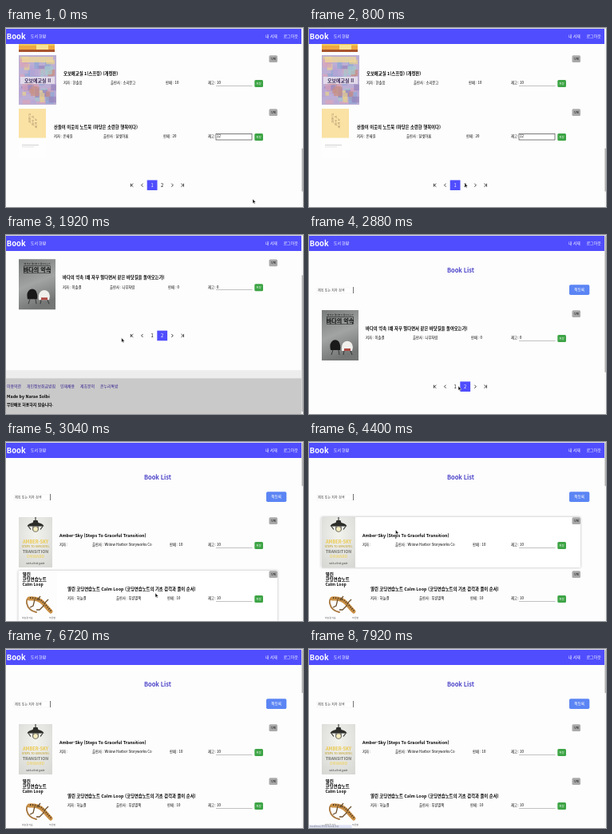
Recreate the animation shown at these times as an HTML page. Size 372 px wide and 224 px high, loop 8000 ms.

```html
<!DOCTYPE html>
<html lang="ko">
<head>
<meta charset="utf-8">
<title>Book List</title>
<style>
  html, body { margin: 0; width: 100%; height: 100%; overflow: hidden; background: #fff; }
  svg { display: block; width: 100vw; height: 100vh; }
  text { font-family: "Noto Sans CJK KR", "Noto Sans CJK", "Noto Sans", sans-serif; white-space: pre; }
  #hover { filter: drop-shadow(0 .6px 1.4px rgba(0, 0, 0, .3)); }
</style>
</head>
<body>
<svg id="stage" viewBox="0 0 372 224"></svg>
<script>
const LOOP = 8000, STEP = 80, VIEW = 224, ROW = 67, TOP = 94;
const INDIGO = '#504dff';

const rect = (x, y, w, h, fill, more = '') =>
  `<rect x="${x}" y="${y}" width="${w}" height="${h}" fill="${fill}" ${more}/>`;
const text = (x, y, size, str, fill = '#000', more = '') =>
  `<text x="${x}" y="${y}" font-size="${size}" fill="${fill}" ${more}>${str}</text>`;
const path = (d, fill, more = '') => `<path d="${d}" fill="${fill}" ${more}/>`;
const MID = ' text-anchor="middle"', MEDIUM = ' font-weight="500"';
const BOLD = ' font-weight="700"', BLACK = ' font-weight="900"';

function random(seed) {
  return () => (seed = (seed * 16807) % 2147483647) / 2147483647;
}

// Book covers, drawn from the top left corner of the picture
const covers = {
  lamp: () => rect(0, 0, 42, 63, 'url(#pale)') +
    path('M21 0V6', 'none', 'stroke="#222" stroke-width="1"') +
    path('M18.5 4h5l1 3q6 1 7 4.5H10.5q1-3.5 7-4.5z', '#2d2d2a') +
    path('M12 11.5l3 4m15-4l-3 4M18 11.5v5m6-5v5', 'none', 'stroke="#2d2d2a" stroke-width="1.1"') +
    `<circle cx="21" cy="15" r="3.4" fill="#f7eec0" stroke="#444" stroke-width=".7"/>` +
    text(21, 33, 5.6, 'AMBER-SKY', '#ecc94a', BOLD + MID) +
    text(21, 38.4, 3.4, 'STEPS TO GRACEFUL', '#c9ad48', BOLD + MID) +
    text(21, 45, 5.3, 'TRANSITION', '#77776f', BOLD + MID) +
    text(21, 51, 5, 'ONWARD', '#ecd477', BOLD + MID) +
    text(21, 59, 2.8, 'with a field guide', '#333', MID),

  lizard: () => rect(0, 0, 48, 63, '#fdfdfd') +
    text(4.5, 7, 5.6, '열린', '#000', BLACK) +
    text(4.5, 13.2, 5.5, '코딩연습노트', '#000', BLACK) +
    text(4.5, 19.4, 5, 'Calm Loop', '#000', BLACK) +
    path('M16 36Q9 32 10 41Q12 50 22 52', 'none', 'stroke="#a8783f" stroke-width="1.8" stroke-linecap="round"') +
    path('M13 35Q25 34 31 41T40 51', 'none', 'stroke="#c98f45" stroke-width="5" stroke-linecap="round"') +
    path('M14 34Q26 34 32 41T41 51', 'none', 'stroke="#4d3a24" stroke-width="2" stroke-dasharray="1.2 1.6"') +
    path('M20 36l-2 8-4 2m18-3l-6 6-4 0m10-8l5-5m-14 1l4-5', 'none', 'stroke="#6d5230" stroke-width="1.3"') +
    text(4, 60, 2.8, '하늘결 지음', '#555') + text(38, 60, 2.8, '푸른별', '#555'),

  strip: () => rect(0, 0, 45, 63, '#f2ca54') + rect(0, 55, 45, 5, '#eda842') +
    rect(0, 60, 45, 3, '#a8542e') + rect(22, 54, 15, 6, '#f8e292'),

  mosaic() {
    const next = random(41), tones = ['#b9a4d4', '#8fa7d4', '#d9a5bd', '#e6cf91', '#a9c6cd', '#c98f86', '#9785bd'];
    let out = rect(0, 0, 47, 62, '#bcaed4');
    for (let i = 0; i < 60; i++) {
      const w = 4 + next() * 8, h = 3 + next() * 9;
      out += rect(next() * (47 - w), next() * (62 - h), w, h, tones[i % tones.length], 'opacity=".75"');
    }
    return out + rect(4, 2, 39, 7, '#efd79b', 'opacity=".8"') +
      rect(2, 27, 43, 9, '#e9e2ee', 'opacity=".85"') +
      text(23.5, 34, 6, '오보에교실 II', '#3b2c58', BOLD + MID);
  },

  yellow: () => rect(0, 0, 34, 62, '#fefefe') + rect(0, 0, 34, 36.5, '#fae2a4') +
    ['산들이', '이웃의', '노트북'].map((s, i) =>
      [...s].map((c, j) => text(12 + i * 4, 9 + j * 4.5 + i * 3, 3.4, c, '#8b6b55')).join('')).join('') +
    rect(4, 45, 21, .8, '#c7c7c7') + rect(4, 47.5, 15, .7, '#d8d8d8'),

  paradox: () => rect(0, 0, 46, 63, 'url(#stone)') +
    text(23, 6.5, 2.8, '왜 자꾸 멀다면서 돌아오는가', '#111', MID) +
    rect(6.5, 8.5, 33, 9, 'none', 'stroke="#222" stroke-width=".6"') +
    text(23, 16, 7, '바다의 약속', '#080808', BLACK + MID) +
    path('M11 50q-2-9 3-12q4-2 7 1q3 4 2 11z', '#191919') +
    path('M25 51q-1-8 3-11q5-3 9 1q3 4 1 10z', '#f0efec') +
    path('M14 50l-2 6m9-6l1 6m6-5l-1 5m9-5l2 5', 'none', 'stroke="#222" stroke-width=".8"') +
    path('M28 48h8v3h-8z', '#b04a43')
};

const book = (row, cover, x, title, author, pubX, pub, soldX, sold, stock, boxed) =>
  ({ row, cover, x, title, author, pubX, pub, soldX, sold, stock, boxed });

const firstPage = [
  book(0, 'lamp', 67, 'Amber-Sky (Steps To Graceful Transition)', '', 108, 'Willow Harbor Storyworks Co', 205, 10, 10),
  book(1, 'lizard', 77, '열린 코딩연습노트 Calm Loop (코딩연습노트의 기초 감각과 풀이 순서)', '하늘결', 138, '푸른별책', 202, 10, 10),
  book(7, 'strip', 72, '', '', 131, '', 200, 10, 10),
  book(8, 'mosaic', 72, '오보에교실 1(스프링) (개정판)', '한솔음', 131, '소리문고', 200, 10, 10),
  book(9, 'yellow', 60, '산들이 이웃의 노트북 (마당은 소란한 행복이다)', '온새길', 122, '달빛아홉', 197, 20, 12, true)
];
const secondPage = [
  book(0, 'paradox', 71, '바다의 약속 (왜 자꾸 멀다면서 같은 바닷길을 돌아오는가)', '이솔결', 130, '나무처럼', 203, 0, 0)
];

function card(b) {
  const info = (x, str) => text(x, 36.3, 4.3, str);
  const field = b.boxed
    ? rect(263, 31.5, 45, 7.5, '#fff', 'stroke="#444" stroke-width=".7"')
    : rect(263, 38, 45.5, .6, '#999');
  return `<g transform="translate(0 ${TOP + b.row * ROW})">
    <g transform="translate(16 0)">${covers[b.cover]()}</g>
    ${text(b.x, 25, 5.35, b.title, '#000', BOLD)}
    ${info(b.x, '저자 : ' + b.author)}${info(b.pubX, '출판사 : ' + b.pub)}
    ${info(b.soldX, '판매 : ' + b.sold)}${info(253, '재고 :')}
    ${field}${info(264, b.stock)}
    ${rect(329.5, .3, 10.5, 8.7, '#aaa', 'rx="1.5"')}${text(334.7, 6, 3.6, '삭제', '#000', MID)}
    ${rect(311.3, 31, 10.7, 9, '#3da445', 'rx="1.5"')}${text(316.6, 36.8, 3.5, '저장', '#fff', MID)}
  </g>`;
}

function pager(y, pages, active) {
  const gap = 12.6, x0 = 189.4 - (pages + 3) * gap / 2;
  const arrow = (i, d) => `<path transform="translate(${x0 + i * gap} ${y})" d="${d}" fill="none" stroke="#111" stroke-width=".8"/>`;
  let out = arrow(0, 'M-1.5-2V2M1.4-2L-.7 0L1.4 2') + arrow(1, 'M1-2L-1 0L1 2') +
    arrow(pages + 2, 'M-1-2L1 0L-1 2') + arrow(pages + 3, 'M1.5-2V2M-1.4-2L.7 0L-1.4 2');
  for (let i = 1; i <= pages; i++) {
    const x = x0 + (i + 1) * gap, on = i === active;
    if (on) out += rect(x - 6.4, y - 6.3, 12.8, 12.6, INDIGO);
    out += text(x, y + 2.1, 5.7, i, on ? '#fff' : '#000', MID + (on ? '' : MEDIUM));
  }
  return out;
}

function footer(y) {
  const links = [[1, '이용약관'], [26, '개인정보취급방침'], [68, '인재채용'], [93, '제휴문의'], [118, '온누리톡방']];
  return rect(0, y - 10, 370, 10, '#ededed') + rect(0, y, 370, 60, '#c9c9c9') +
    links.map(([x, s]) => text(x, y + 11.5, 4.9, s, '#35208f', MEDIUM)).join('') +
    text(1, y + 25, 5.3, 'Made by Narae Solbi', '#000', BOLD) +
    text(1, y + 35, 4.9, '무단배포 허용하지 않습니다.', '#000', BOLD);
}

function page(id, rows, books, pages, active) {
  const end = rows ? rows * ROW : 1;
  const edge = rows ? '#f0f0f0' : '#777';
  return `<g id="${id}">
    ${text(190, 47, 7.4, 'Book List', '#4a42c8', BOLD + MID)}
    ${rect(10, 66, 45.7, 7, '#fff', `stroke="${edge}" stroke-width=".6"`)}
    ${rect(55, 65, .9, 8, '#666')}
    ${text(11, 71, 4.1, '제목 또는 저자 검색', '#444')}
    ${rect(326, 62.3, 25.3, 12.7, '#5b85f4', 'rx="1.8"')}
    ${text(338.6, 70.4, 4.8, '책등록', '#fff', MID + MEDIUM)}
    ${books.map(card).join('')}${pager(122.7 + end, pages, active)}${footer(176 + end)}
  </g>`;
}

const stage = document.getElementById('stage');
stage.innerHTML = `
  <defs>
    <linearGradient id="stone" x2=".3" y2="1"><stop stop-color="#777b7a"/><stop offset=".55" stop-color="#a2a4a3"/><stop offset="1" stop-color="#737675"/></linearGradient>
    <radialGradient id="pale" cy=".35" r=".8"><stop stop-color="#f3f3ee"/><stop offset="1" stop-color="#d6d7d3"/></radialGradient>
  </defs>
  ${rect(0, 0, 372, VIEW, '#fdfdfd')}
  ${rect(15.5, 0, 324.5, 63, '#fff', 'id="hover"')}
  ${page('first', 10, firstPage, 2, 1)}
  ${page('second', 1, secondPage, 2, 2)}
  ${page('empty', 0, [], 1, 1)}
  ${rect(0, 0, 370, 20, INDIGO)}
  ${text(.8, 14.2, 9.4, 'Book', '#fff', BOLD)}
  ${text(31, 12.3, 4.9, '도서 현황', '#fff', MEDIUM)}
  ${text(325, 12.3, 4.9, '내 서재', '#fff', MEDIUM)}
  ${text(347.5, 12.3, 5, '로그아웃', '#fff', MEDIUM)}
  ${rect(370, 0, 2, VIEW, '#f7f7f7')}
  ${rect(370.5, 0, 1.5, 10, '#b0b0b0', 'id="thumb" rx=".7"')}
  ${rect(0, 0, 372, 1, '#dcdcdc')}
  <g id="status">${rect(0, 220.3, 53.5, 4, '#dfe3f6')}${text(1, 223.4, 3.2, 'localhost:3000/book/list', '#777')}</g>
  ${path('M0 0V5.4L1.3 4.3L2.1 6.2L3 5.8L2.2 4H3.8z', '#111', 'id="cursor" stroke="#fff" stroke-width=".4"')}`;

const el = {};
stage.querySelectorAll('[id]').forEach(e => el[e.id] = e);
const show = (e, on) => e.setAttribute('display', on ? 'inline' : 'none');

const ease = p => p * p * (3 - 2 * p);
const ramp = (t, a, b) => ease(Math.min(1, Math.max(0, (t - a) / (b - a))));

// Pointer path: time, x, y
const track = [
  [0, 309, 214], [400, 195, 194], [960, 195, 194], [1440, 143.5, 127], [1840, 143.5, 127],
  [2640, 187, 189], [3520, 187, 189], [4320, 108.5, 110], [4400, 108.5, 110],
  [4880, 150, 172], [5280, 120, 78], [5840, 60, -12]
];

function pointer(t) {
  const i = track.findIndex(k => k[0] > t);
  if (i < 0) return track[track.length - 1].slice(1);
  const [t0, x0, y0] = track[i - 1], [t1, x1, y1] = track[i], p = ramp(t, t0, t1);
  return [x0 + (x1 - x0) * p, y0 + (y1 - y0) * p];
}

function view(t) {
  if (t < 960) return { id: 'first', rows: 10, scroll: 596 };
  if (t < 2960) return { id: 'second', rows: 1, scroll: 66 * (1 - ramp(t, 1840, 2560)) };
  if (t >= 6080 && t < 6160) return { id: 'empty', rows: 0, scroll: 0 };
  return { id: 'first', rows: 10, scroll: 0 };
}

function draw(t) {
  const { id, rows, scroll } = view(t);
  for (const name of ['first', 'second', 'empty']) show(el[name], name === id);
  el[id].setAttribute('transform', `translate(0 ${-scroll})`);

  const total = VIEW - 1 + rows * ROW;
  show(el.thumb, rows > 0);
  el.thumb.setAttribute('y', 1 + scroll / total * VIEW);
  el.thumb.setAttribute('height', VIEW * VIEW / total - 2);

  const [x, y] = pointer(t);
  const row = Math.floor((y + scroll - TOP) / ROW), top = TOP + row * ROW - scroll;
  show(el.hover, x > 15 && x < 341 && y > 20 && row >= 0 && row < rows && y < top + 63);
  el.hover.setAttribute('y', top);
  el.cursor.setAttribute('transform', `translate(${x} ${y})`);
  show(el.status, t >= 6960);
}

const start = performance.now();
function tick() {
  const t = (performance.now() - start) % LOOP;
  draw(Math.floor(t / STEP) * STEP);
  requestAnimationFrame(tick);
}
tick();
</script>
</body>
</html>
```
